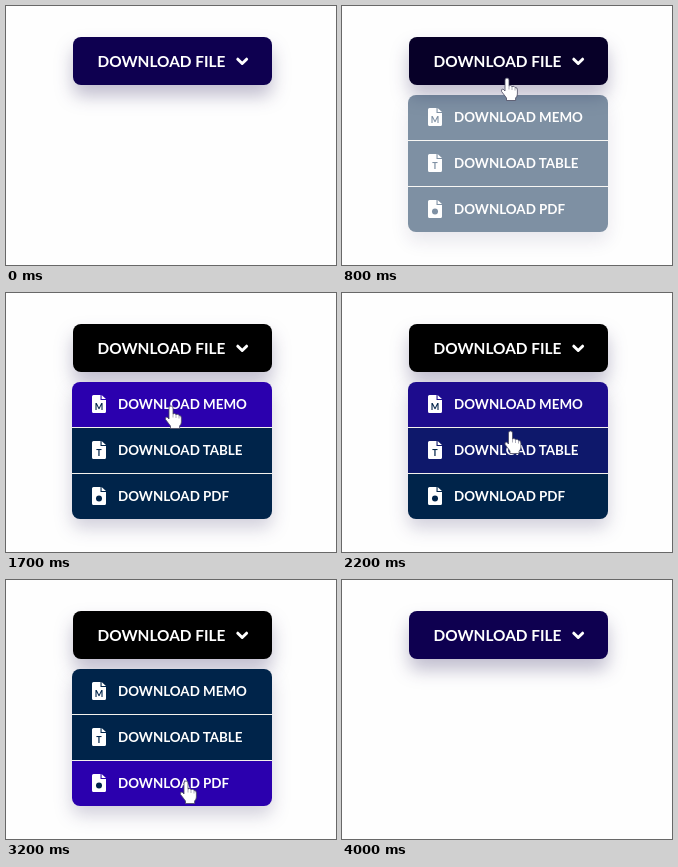
Recreate the animation shown at these times as an HTML page. Size 330 px wide and 259 px high, loop 4.1 s.

```html
<!DOCTYPE html>
<html lang="en">
<head>
<meta charset="utf-8">
<style>
  html, body { margin: 0; width: 100%; height: 100%; overflow: hidden; background: #fefefe; }
  svg { display: block; width: 330px; height: 259px; }
  text { font-family: Lato, sans-serif; font-weight: 700; fill: #fff; }
  .title { font-size: 15.4px; }
  .label { font-size: 13.4px; }
  .letter { font-size: 9px; fill: #00244a; text-anchor: middle; }
  #button { filter: drop-shadow(0 11px 9px rgba(30, 18, 80, .27)); }
  #menu { filter: drop-shadow(0 9px 9px rgba(30, 18, 80, .2)); }
</style>
</head>
<body>
<svg viewBox="0 0 330 259">
  <clipPath id="round"><rect x="66" y="89" width="200" height="137" rx="8"/></clipPath>
  <g id="button">
    <rect id="face" x="67" y="31" width="199" height="48" rx="8"/>
  </g>
  <text class="title" x="91.5" y="61">DOWNLOAD FILE</text>
  <path d="M231.8 53.2l4.4 4.3 4.4-4.3" fill="none" stroke="#fff" stroke-width="3" stroke-linecap="round" stroke-linejoin="round"/>
  <g id="menu"><g id="items" clip-path="url(#round)"></g></g>
  <g id="cursor">
    <path d="M-2 2Q-2 0 0 0Q2 0 2 2V8Q3.5 6.6 5 8.6Q7 7.4 8 9.6Q10.4 9 10.4 12V16Q10.4 18.5 8.6 20V22.5H-.5V20L-5.4 13.5Q-6.2 11 -4 11L-2 13Z"
      fill="#fff" stroke="#4a4a60" stroke-width=".8" stroke-linejoin="round"/>
    <path d="M2 8V11.5M5 9V12M8 10V12.5" stroke="#8c8c9c" stroke-width=".7"/>
  </g>
</svg>
<script>
const LOOP = 4100, STEP = 100;
const NAVY = [14, 0, 80], BLACK = [0, 0, 0], BLUE = [0, 36, 74], PURPLE = [43, 0, 174];
const $ = id => document.getElementById(id);

// label, icon letter, hover start, hover end
const rows = [
  ['MEMO', 'M', 1300, 2100],
  ['TABLE', 'T', 2100, 2800],
  ['PDF', '', 2800, 3500]
];

// time, x, y of the fingertip
const path = [
  [200, 174, 226], [600, 165, 72], [1100, 165, 72], [1200, 165, 76], [1700, 165, 113],
  [1800, 165, 113], [2600, 172, 163], [3200, 180, 201], [3800, 187, 262]
];

$('items').innerHTML = rows.map(([name, letter], i) => {
  const y = 89 + 46 * i;
  const mark = letter
    ? `<text class="letter" x="93" y="${y + 28}">${letter}</text>`
    : `<circle cx="93" cy="${y + 24.5}" r="3" fill="#00244a"/>`;
  return `<rect id="row${i}" x="66" y="${y}" width="200" height="46"/>
    ${i < 2 ? `<path d="M66 ${y + 45.5}h200" stroke="#f4f2ec"/>` : ''}
    <path d="M87.5 ${y + 13}h7v5h5.5v11.5q0 1.5-1.5 1.5h-11q-1.5 0-1.5-1.5v-15q0-1.5 1.5-1.5zM95.6 ${y + 13}l4.4 4h-4.4z" fill="#fff"/>
    ${mark}
    <text class="label" x="112" y="${y + 27}">DOWNLOAD ${name}</text>`;
}).join('');

const ramp = (t, start, length) => Math.min(1, Math.max(0, (t - start) / length));
const pulse = (t, on, off, length) => ramp(t, on, length) - ramp(t, off, length);
const mix = (a, b, k) => `rgb(${a.map((v, i) => v + (b[i] - v) * k)})`;

function fingertip(t) {
  const i = path.findIndex(p => p[0] > t);
  if (i < 1) return null;
  const [a, b] = [path[i - 1], path[i]];
  const k = (t - a[0]) / (b[0] - a[0]);
  return [a[1] + (b[1] - a[1]) * k, a[2] + (b[2] - a[2]) * k];
}

function draw(now) {
  const t = Math.floor(now % LOOP / STEP) * STEP;
  $('face').setAttribute('fill', mix(NAVY, BLACK, pulse(t, 600, 3500, 400)));
  $('menu').setAttribute('opacity', pulse(t, 600, 3500, 400));
  rows.forEach(([, , on, off], i) =>
    $('row' + i).setAttribute('fill', mix(BLUE, PURPLE, pulse(t, on, off, 300))));
  const tip = fingertip(t);
  $('cursor').setAttribute('visibility', tip ? 'visible' : 'hidden');
  if (tip) $('cursor').setAttribute('transform', `translate(${tip})`);
}

const start = performance.now();
function tick() {
  draw(performance.now() - start);
  requestAnimationFrame(tick);
}
tick();
</script>
</body>
</html>
```
